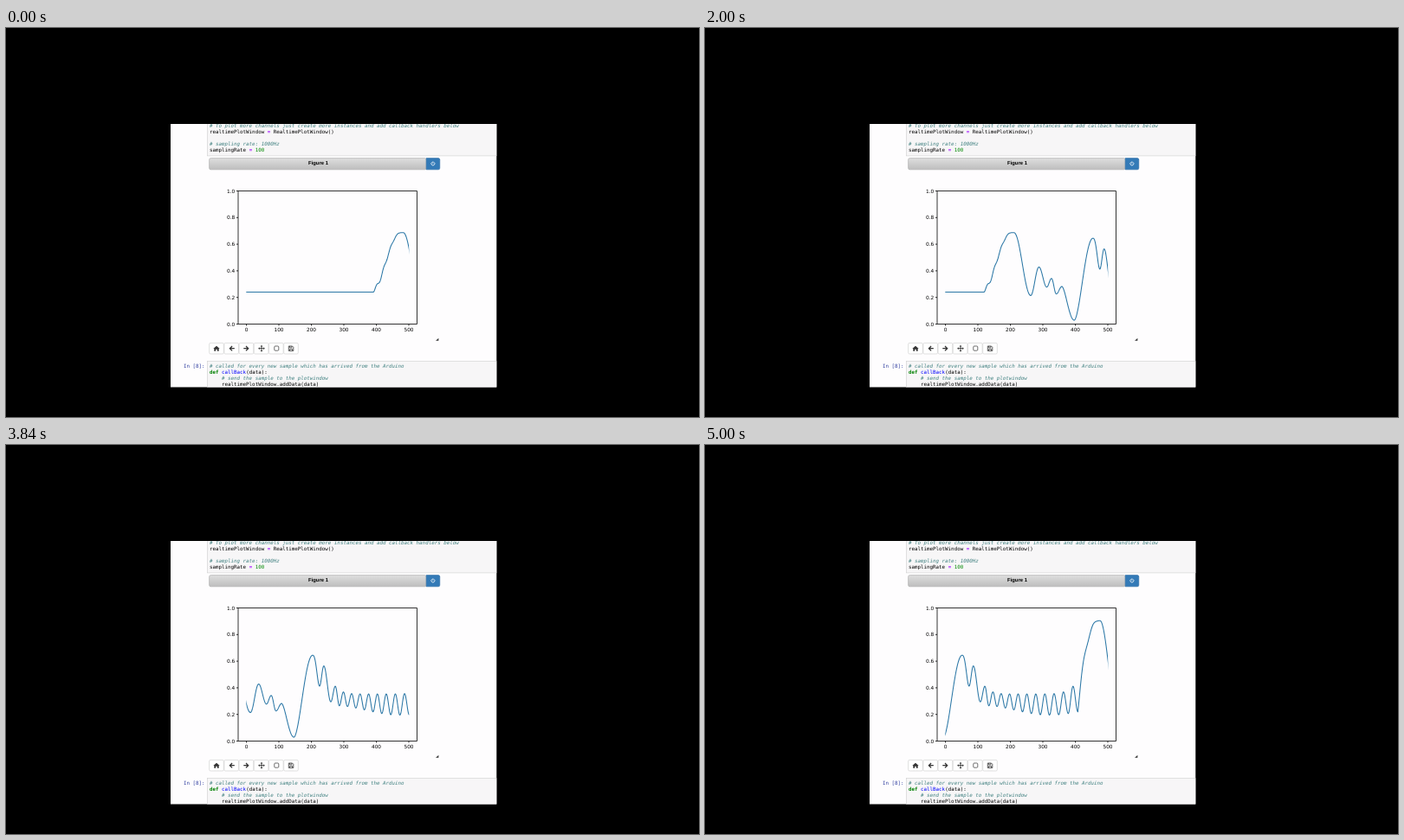
These frames come from a looping animation (800 px wide and 450 px high, 5.04 s). An HTML page:

```html
<!DOCTYPE html>
<html lang="en">
<head>
<meta charset="utf-8">
<title>Realtime plot</title>
<style>
html, body { margin: 0; width: 100%; height: 100%; overflow: hidden; background: #000; }
svg { display: block; width: 800px; height: 450px; }
text { white-space: pre; text-rendering: geometricPrecision; }
.code { font: 5.84px "DejaVu Sans Mono", monospace; }
.note { fill: #408080; font-style: italic; }
.num { fill: #080; }
.op { fill: #a2f; font-weight: bold; }
.key { fill: #008000; font-weight: bold; }
.name { fill: #00f; }
.cell { fill: #f7f6f7; stroke: #cfcfcf; stroke-width: .6; }
.label { font: 5.8px "DejaVu Sans", sans-serif; }
.button { fill: #fff; stroke: #ccc; stroke-width: .6; }
.icon { fill: none; stroke: #333; stroke-width: 1.3; }
</style>
</head>
<body>
<svg viewBox="0 0 800 450">
  <defs>
    <clipPath id="page"><path d="M190 111H566.3V415.5H190z"/></clipPath>
    <clipPath id="window"><path d="M277.3 180H465.3V350H277.3z"/></clipPath>
    <linearGradient id="bar" x2="0" y2="1">
      <stop stop-color="#dedede"/><stop offset="1" stop-color="#bdbdbd"/>
    </linearGradient>
  </defs>
  <g clip-path="url(#page)">
    <path fill="#fefdfe" d="M190 111H567V416H190z"/>
    <rect class="cell" x="232.3" y="100" width="340" height="47.9"/>
    <rect class="cell" x="232.3" y="385.6" width="340" height="40"/>
    <g class="code">
      <text class="note" x="235" y="114.6"># To plot more channels just create more instances and add callback handlers below</text>
      <text x="235" y="122.1">realtimePlotWindow <tspan class="op">=</tspan> RealtimePlotWindow()</text>
      <text class="note" x="235" y="136.3"># sampling rate: 1000Hz</text>
      <text x="235" y="143.3">samplingRate <tspan class="op">=</tspan> <tspan class="num">100</tspan></text>
      <text x="205" y="392.8" fill="#303f9f">In [8]:</text>
      <text class="note" x="235" y="392.8"># called for every new sample which has arrived from the Arduino</text>
      <text x="235" y="399.9"><tspan class="key">def</tspan> <tspan class="name">callBack</tspan>(data):</text>
      <text class="note" x="235" y="407">    # send the sample to the plotwindow</text>
      <text x="235" y="414">    realtimePlotWindow.addData(data)</text>
    </g>

    <rect x="234.6" y="150.6" width="250.6" height="13.2" rx="1.8" fill="url(#bar)" stroke="#aaa" stroke-width=".6"/>
    <text x="360.5" y="158" text-anchor="middle" style="font:bold 5.9px 'Liberation Sans',sans-serif">Figure 1</text>
    <path fill="#337ab7" stroke="#2e6da4" stroke-width=".6" d="M485.2 150.6h13.9q1.7 0 1.7 1.7v9.8q0 1.7-1.7 1.7h-13.9z"/>
    <path fill="none" stroke="#fff" stroke-width=".8" d="M491.7 155.3a2 2 0 1 0 2.4 0M492.9 154.3v2.5"/>

    <g id="axes" class="label">
      <path id="ticks" fill="none" stroke="#000" stroke-width=".8"/>
    </g>
    <g clip-path="url(#window)">
      <path id="curve" fill="none" stroke="#2b77a6" stroke-width="1.05" stroke-linejoin="round"/>
    </g>
    <path fill="#333" d="M499.4 358.8v2.9h-3.4z"/>

    <g id="buttons"></g>
    <path fill="#333" d="M239.3 371l3.7-3.3 3.7 3.3h-1v2.7h-1.9v-2h-1.6v2h-1.9V371z"/>
    <path class="icon" d="M263.8 370.7h-5.4m2.7-2.7l-2.7 2.7 2.7 2.7M274.3 370.7h5.4m-2.7-2.7l2.7 2.7-2.7 2.7"/>
    <path class="icon" style="stroke-width:.9" d="M291.8 370.7h6.4M295 367.5v6.4"/>
    <path fill="#333" d="M295 366.9l1.4 1.6h-2.8zM295 374.5l1.4-1.6h-2.8zM291.2 370.7l1.6-1.4v2.8zM298.8 370.7l-1.6-1.4v2.8z"/>
    <rect class="icon" style="stroke-width:.7" x="309.8" y="368" width="5" height="5.2" rx="1"/>
    <path class="icon" style="stroke-width:.8" d="M326.3 368h4.2l1.3 1.3v4.2h-5.5zM327.6 368v1.8h2.3V368M327.6 373.4v-1.9h3v1.9"/>
  </g>
</svg>
<script>
const LOOP = 5040, STEP = 40, SPEED = 0.051, STALL = 3920;
const byId = id => document.getElementById(id);

function add(parent, tag, attrs, text = '') {
  const el = document.createElementNS('http://www.w3.org/2000/svg', tag);
  for (const key in attrs) el.setAttribute(key, attrs[key]);
  el.textContent = text;
  byId(parent).append(el);
}

let ticks = 'M268 188.5H474.5V342.5H268z';
for (let i = 0; i < 6; i++) {
  const x = 277.5 + 37.5 * i, y = 342.5 - 30.8 * i;
  ticks += `M${x} 342.5v2M268 ${y}h-2`;
  add('axes', 'text', { x, y: 351, 'text-anchor': 'middle' }, 100 * i);
  add('axes', 'text', { x: 264.2, y: y + 2.1, 'text-anchor': 'end' }, (i / 5).toFixed(1));
  add('buttons', 'rect', { class: 'button', x: 234.7 + 17.2 * i, y: 364.4, width: 16.6, height: 12.6, rx: 1.4 });
}
byId('ticks').setAttribute('d', ticks);

// Alternating crests and dips; the dips deepen and the spacing slowly widens.
const ripple = Array.from({ length: 22 }, (_, i) => [
  576 + 4.62 * i + 0.0235 * i * i,
  i % 2 ? 301.5 + 11 * Math.sin(Math.PI * i / 30) ** 2 : 288 - 9 * (i / 10 - 1) ** 6
]);

// Turning points: x, y, then skew and bump count of the stretch leading there.
const turns = [
  [270, 305.5], [424, 305.5], [456, 236.8, 0.9, 4], [458.8, 236.8],
  [478, 309.5], [487.5, 276.5], [496.5, 299.7], [502, 289.7], [507.5, 307.7], [514, 299],
  [528.3, 338, 0.85], [549.8, 243.2, 0.88], [557.8, 279, 1.3], [562.7, 255.5], [570.8, 297.2],
  ...ripple,
  [708, 203.3, 0.52, 2], [709, 203.3], [729, 310]
];

// Skewed cosine easing from one turning point to the next, with fading bumps.
let path = 'M' + turns[0];
for (let i = 1; i < turns.length; i++) {
  const [x0, y0] = turns[i - 1], [x1, y1, skew = 1, bumps = 0] = turns[i];
  const steps = Math.ceil((x1 - x0) * 2);
  for (let n = 1; n <= steps; n++) {
    const p = n / steps;
    const ease = (1 - Math.cos(Math.PI * p ** skew)) / 2;
    const bump = 0.04 * (1 - p) * (1 - Math.cos(2 * Math.PI * bumps * p));
    path += `L${x0 + (x1 - x0) * p} ${y0 + (y1 - y0) * (ease + bump)}`;
  }
}
const curve = byId('curve');
curve.setAttribute('d', path);

const start = performance.now();
function draw() {
  const time = Math.floor((performance.now() - start) % LOOP / STEP) * STEP;
  const running = time > STALL ? time - STEP : time;
  curve.setAttribute('transform', `translate(${-SPEED * running})`);
  requestAnimationFrame(draw);
}
draw();
</script>
</body>
</html>
```
